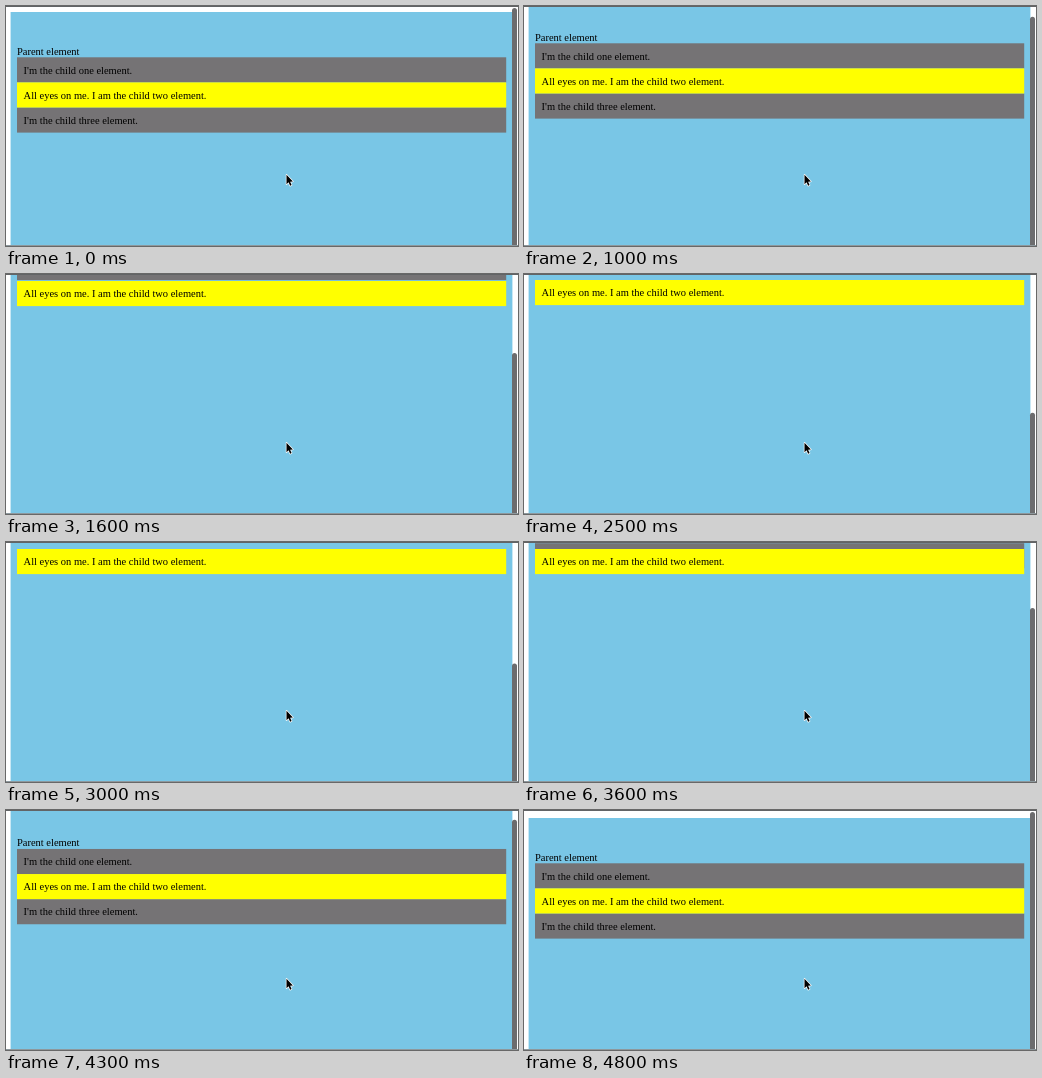
Animation of 512 by 240 pixels, one loop 4900 ms. Source, as an HTML page with a canvas:

```html
<!DOCTYPE html>
<html lang="en">
<head>
<meta charset="utf-8">
<title>Sticky child</title>
<style>
  html, body { margin: 0; width: 512px; height: 240px; overflow: hidden; background: #fff; }
  canvas { display: block; }
</style>
</head>
<body>
<canvas id="stage" width="512" height="240"></canvas>
<script>
const ctx = document.getElementById('stage').getContext('2d');
const LOOP = 4900, STEP = 100;
const ROW = 25.1, FIRST = 53.3;
const BLUE = '#79c6e6', GRAY = '#757375', YELLOW = '#ffff00';

// [time in ms, scroll offset in px]
const keys = [
  [0, 2], [600, 4.5], [800, 8], [1000, 16], [1200, 43], [1400, 84], [1600, 122.5],
  [1800, 152], [2100, 177], [2400, 193], [2500, 216], [2700, 222], [3000, 189],
  [3300, 144], [3600, 102.3], [4000, 46.6], [4200, 23], [4400, 8], [4600, 1.5], [4800, 0], [4900, 0]
];

const slope = i => (keys[i + 1][1] - keys[i][1]) / (keys[i + 1][0] - keys[i][0]);

// Harmonic mean of neighbouring slopes keeps the curve free of overshoot.
function tangent(i) {
  if (i === 0) return slope(0);
  if (i === keys.length - 1) return 0;
  const a = slope(i - 1), b = slope(i);
  return a * b <= 0 ? 0 : 2 * a * b / (a + b);
}

function scrollAt(t) {
  let i = 0;
  while (i < keys.length - 2 && t >= keys[i + 1][0]) i++;
  const [t0, a] = keys[i], [t1, b] = keys[i + 1];
  const d = t1 - t0, u = (t - t0) / d, v = 1 - u;
  return a * v * v * (1 + 2 * u) + b * u * u * (3 - 2 * u)
    + d * u * v * (tangent(i) * v - tangent(i + 1) * u);
}

function rect(color, x, y, w, h) {
  ctx.fillStyle = color;
  ctx.fillRect(x, y, w, h);
}

function text(str, x, y) {
  ctx.fillStyle = '#000';
  ctx.fillText(str, x, y);
}

function child(str, y, color) {
  rect(color, 11, y, 489.2, ROW);
  text(str, 17.6, y + 16.2);
}

function thumb(y) {
  ctx.fillStyle = '#6c6c6e';
  ctx.beginPath();
  ctx.roundRect(506, y, 5, 300, 2.5);
  ctx.fill();
}

function cursor(x, y) {
  const shape = [[0, 0], [0, 9.4], [2.1, 7.5], [3.6, 11], [5.1, 10.3], [3.6, 6.9], [6.4, 6.7]];
  ctx.beginPath();
  shape.forEach(([dx, dy]) => ctx.lineTo(x + dx, y + dy));
  ctx.closePath();
  ctx.lineJoin = 'round';
  ctx.lineWidth = 1.4;
  ctx.strokeStyle = '#fff';
  ctx.stroke();
  ctx.fillStyle = '#000';
  ctx.fill();
}

function draw(t) {
  const s = scrollAt(t);
  const top = FIRST - s;
  const stick = 7 - Math.min(1, Math.max(0, (s - 200) / 16));

  rect('#fff', 0, 0, 512, 240);
  rect(BLUE, 4.6, 8 - s, 501.8, 600);
  ctx.font = '10.47px "Liberation Serif", Times, serif';
  text('Parent element', 11, top - 2.8);
  child("I'm the child one element.", top, GRAY);
  child("I'm the child three element.", top + 2 * ROW, GRAY);
  child('All eyes on me. I am the child two element.', Math.max(stick, top + ROW), YELLOW);

  thumb(Math.max(2, 0.6 + 0.64 * s));
  rect('#626466', 0, 0, 512, 1);
  rect('#8d989d', 0, 239, 512, 1);
  cursor(280.5, 168.8);
}

function frame() {
  const t = performance.now() % LOOP;
  draw(Math.floor(t / STEP) * STEP);
  requestAnimationFrame(frame);
}
frame();
</script>
</body>
</html>
```
